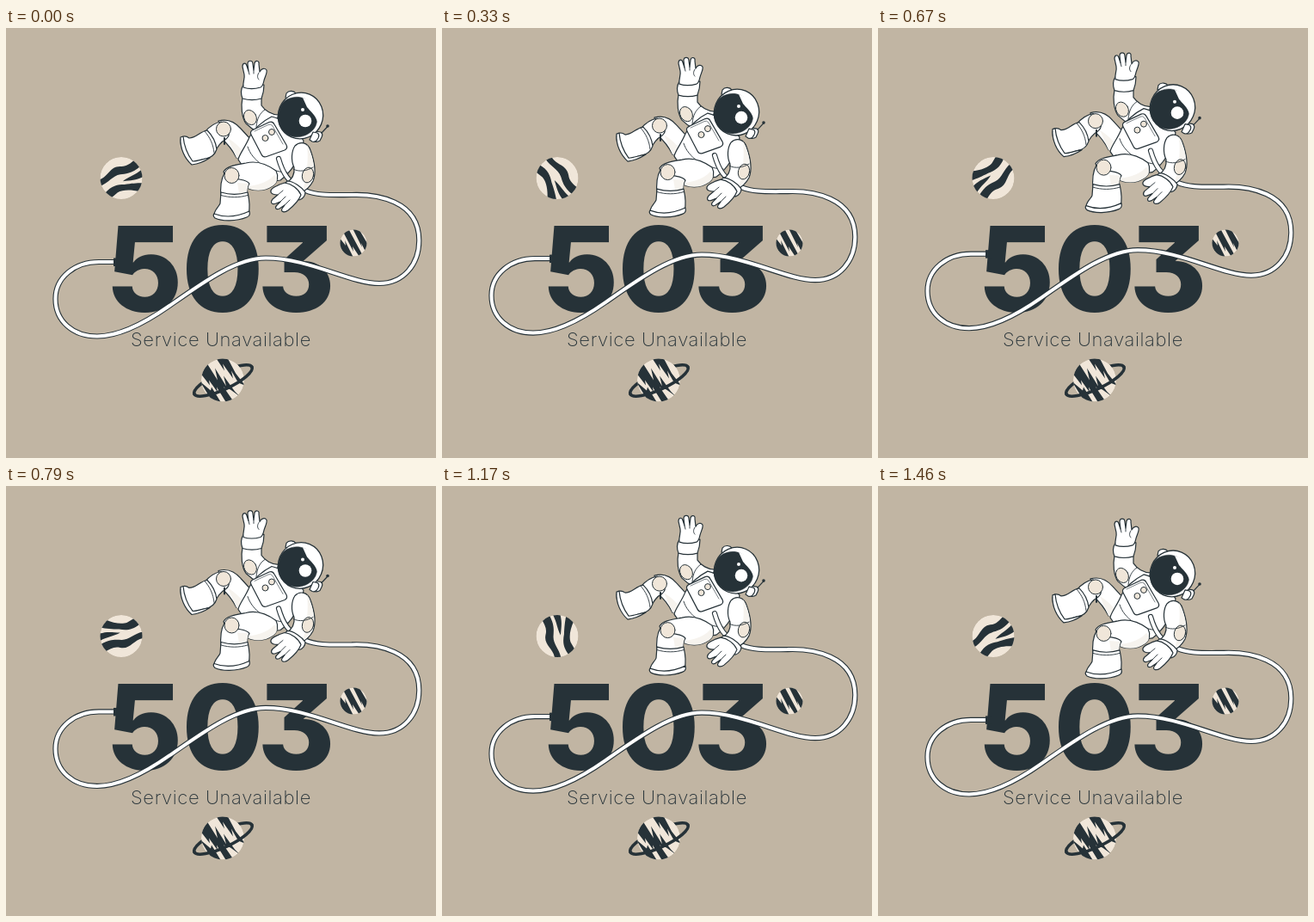
Write an HTML page with a canvas that moves like this. It is 500x500 px and loops after 1500 ms.

```html
<!DOCTYPE html>
<html lang="en">
<head>
<meta charset="utf-8">
<title>503</title>
<style>
  html, body { margin: 0; width: 100%; height: 100%; overflow: hidden; background: #c1b5a3; }
  svg, canvas { position: absolute; left: 0; top: 0; width: 500px; height: 500px; }
  text { fill: #263238; text-anchor: middle; font-family: Inter, "Open Sans", sans-serif; }
  .code { font-size: 137px; font-weight: 780; font-feature-settings: "cv09"; }
  .caption { font-size: 22px; font-weight: 200; letter-spacing: 0.6px; }
</style>
</head>
<body>
<svg viewBox="0 0 500 500">
  <text class="code" x="162 252 337.5" y="329.5">503</text>
  <text class="caption" x="250" y="370">Service Unavailable</text>
</svg>
<canvas id="stage"></canvas>
<script>
const LOOP = 1500, TAU = Math.PI * 2;
const INK = '#263238', CREAM = '#f0e6d9', WHITE = '#fff', SHADE = '#f6f3ee';
const canvas = document.getElementById('stage');
const ctx = canvas.getContext('2d');
const ratio = window.devicePixelRatio || 1;
canvas.width = canvas.height = 500 * ratio;
ctx.lineCap = ctx.lineJoin = 'round';

// A null fill means outline only; a zero line means fill only.
const part = (d, fill = WHITE, line = 1.2) => ({ path: new Path2D(d), fill, line });
const crease = (d, line = 0.9) => part(d, null, line);

function oval(x, y, rx, ry = rx, angle = 0, fill = WHITE, line = 1) {
  const path = new Path2D();
  path.ellipse(x, y, rx, ry, angle, 0, TAU);
  return { path, fill, line };
}

function paint(parts) {
  ctx.strokeStyle = INK;
  for (const { path, fill, line } of parts) {
    if (fill) { ctx.fillStyle = fill; ctx.fill(path); }
    if (line) { ctx.lineWidth = line; ctx.stroke(path); }
  }
}

const raisedArm = [
  part('M275 81 C273 91 274 104 279 111 C287 119 300 126 308 127 L317 101 C309 101 301 96 297 90 L297 81Z'),
  oval(284, 104, 7, 9, -0.5, CREAM),
  crease('M291 115 C292 105 295 99 301 95'),
  part('M276 66 C273 71 273 77 275 82 C282 84 290 84 297 82 C299 77 300 72 300 66Z'),
  part('M276 69 C275 63 278 59 277 54 L275 45 C275 40 279 40 280 44 L282 50 L281 42 C281 37 287 37 287 42 L288 49 L289 41 C290 37 295 38 294 42 L295 51 C297 47 301 46 303 49 C304 52 301 57 300 61 C299 66 298 68 296 69 C289 71 282 71 276 69Z'),
  crease('M282 50 L283 54 M288 49 L288 53 M294 52 C292 55 292 58 294 60')
];

const body = [
  part('M309 103 C299 108 288 117 283 127 C278 139 271 147 270 153 C280 170 300 180 319 177 C329 170 344 151 346 131 C339 120 323 106 309 103Z'),
  crease('M281 138 C286 154 304 167 327 168')
];

const farLeg = [
  part('M247 108 C258 105 267 110 273 117 L284 129 C286 142 280 152 268 151 C264 143 258 135 251 129Z'),
  part('M258 128 C266 133 273 139 278 148 C274 152 271 152 268 151Z', SHADE, 0),
  part('M231 121 C237 114 244 110 250 109 C260 113 262 124 256 129 C249 133 245 139 242 146 L235 148Z'),
  part('M213 128 C221 128 226 120 234 119 C240 125 244 133 245 141 C243 147 238 151 232 152 C225 153 222 157 217 157 C209 152 203 140 203 130 C204 125 209 125 213 128Z'),
  part('M203 127 C202 140 208 152 216 159 C224 158 231 155 237 151 C229 152 223 155 217 155 C211 147 207 137 206 126Z', WHITE, 1.2),
  crease('M231 120 C237 127 241 135 242 145'),
  oval(253, 117.5, 8.5, 8.5, 0, CREAM),
  crease('M254 128 L254 135', 2)
];

const nearLeg = [
  part('M253 167 C257 160 269 159 279 157 C291 154 303 158 314 166 C317 172 316 179 311 183 C300 191 286 190 277 184 L258 182Z'),
  part('M277 184 C288 184 303 181 312 171 C317 175 315 180 311 183 C300 191 286 190 277 184Z', SHADE, 0),
  part('M254 169 C249 177 249 187 250 198 L281 198 C280 191 280 185 283 181 C278 174 268 179 254 169Z'),
  part('M269 180 L282 181 C280 187 280 193 281 198 L272 198Z', SHADE, 0),
  oval(262.5, 171.5, 8.5, 9, 0, CREAM),
  part('M250 191 C260 194 271 194 281 191 C283 200 284 209 282 216 C270 223 253 223 242 219 C241 212 247 209 249 204Z'),
  part('M242 216 C255 221 270 219 283 213 C284 217 283 219 280 220 C268 225 251 225 243 221 C241 219 241 217 242 216Z', WHITE, 1.2),
  crease('M250 194.5 C260 197.5 271 197.5 281 194.5')
];

const chest = [
  part('M288 118 L306 109.5 Q310 108 312 112 L326 136 Q328 140 324 142 L303 149.5 Q299 151 297 147 L285 124 Q283 120 288 118Z'),
  crease('M289 120 L305 112.5 Q308 111 310 114 L322 135', 0.6),
  oval(301.5, 128, 3.5, 3.5, 0, CREAM),
  oval(309, 121, 3.5, 3.5, 0, CREAM)
];

const loweredArm = [
  part('M336 137 C342 131 351 133 354 142 C358 153 361 168 357 178 C354 184 347 190 341 193 L326 180 C333 176 336 171 335 162 C331 154 332 143 336 137Z'),
  part('M350 136 C357 148 361 168 356 178 C353 183 349 186 345 189 C350 172 352 153 350 136Z', SHADE, 0),
  oval(351, 171, 6.5, 9, 0.25, CREAM),
  crease('M334 164 C341 168 350 166 357 162'),
  part('M327 178 C334 178 344 185 348 191 C348 195 345 199 341 200 L321 184Z'),
  part('M324 180 C332 181 340 187 343 194 C340 202 333 208 328 212 C324 215 319 214 321 210 L324 206 L318 210 C314 212 312 209 315 206 L319 202 L314 204 C309 206 307 203 310 199 L316 194 C312 194 307 193 308 189 C309 185 315 184 318 182Z'),
  crease('M319 202 L325 196 M324 206 L330 200 M316 194 L322 189')
];

const head = [
  part('M325 81 L326 76 C329 72 335 73 337 76 L336 83Z'),
  part('M360 120 L366 121 Q369 123 367 127 L365 131 Q362 133 359 132 L355 130Z'),
  oval(342.5, 102, 26, 27, 0.4, WHITE, 1.3),
  part('M357 121 L362 122 Q365 124 363 128 L361 131 Q359 133 356 132 L353 130Z'),
  part('M327 83 C337 78 347 80 354 87 C361 94 364 105 360 114 C355 124 341 130 329 125 C318 119 315 109 317 99 C318 92 321 86 327 83Z', INK, 0.5),
  part('M345 81 C355 84 364 92 365 104 C365 106 364 108 362 109 C360 101 354 97 350 92Z', WHITE, 0),
  oval(348, 108, 7.3, 7.3, 0, WHITE, 0),
  oval(345, 95, 2, 2, 0, WHITE, 0),
  crease('M367 122 L374 114.5', 1.2),
  oval(374, 114, 1.8, 1.8, 0, INK, 0)
];

const tube = new Path2D('M317 152 C321 166 328 182 348 189 C362 195 378 194 402 194 C430 193 480.3 200 480.3 247 C480.3 275 462 297 434 297 C400 297 352 267.5 302 267.5 C268 267.5 230 295 190 323 C160 344 132 358.5 106 358.5 C78 358.5 57.5 341 57.5 315 C57.5 290 80 272 108 272 L127 272');

const waves = new Path2D(
  'M-24 -17 C-12 -9 -2 -20 8 -11 C13 -6 19 -6 26 -6 L26 4 C12 4 7 -1 2 -4 C-6 -9 -14 -5 -25 -9Z' +
  'M-26 1 C-14 -1 -8 3 -2 8 C6 13 10 16 17 22 L6 26 C0 17 -8 11 -14 10 L-26 10Z' +
  'M-1 4 C8 4 14 8 26 8 L23 16 C12 14 8 10 -1 4Z');
const shards = new Path2D(
  'M-25 -7 L-18 -19 L-6 0 L-9 -14 L4 7 L1 -5 L14 13 L20 19 L9 11 L1 8 L12 24 L4 26 L-7 8 L-6 14 L-16 0 L-15 6Z' +
  'M-8 -26 L2 -11 L0 -19 L12 -2 L10 -11 L18 3 L26 6 L15 -8 L6 -25Z' +
  'M-26 2 L-14 12 L-13 8 L-2 26 L-12 25Z');
const streaks = new Path2D(
  'M-17 -7 L-9 3 L-10 -3 L0 17 L-8 16 L-17 3Z' +
  'M-12 -13 L0 10 L-1 4 L7 16 L10 13 L-5 -15Z' +
  'M-1 -17 L10 5 L9 0 L14 10 L17 2 L7 -15Z');

function planet(x, y, radius, pattern, angle = 0) {
  ctx.save();
  ctx.translate(x, y);
  ctx.beginPath();
  ctx.arc(0, 0, radius, 0, TAU);
  ctx.clip();
  ctx.fillStyle = CREAM;
  ctx.fill();
  ctx.rotate(angle);
  ctx.fillStyle = INK;
  ctx.fill(pattern);
  ctx.restore();
}

function ringHalf(from, to) {
  ctx.beginPath();
  ctx.ellipse(252.5, 410, 37, 10, -0.44, from, to);
  ctx.strokeStyle = INK;
  ctx.lineWidth = 3.6;
  ctx.stroke();
}

function drawTube() {
  for (const [color, width] of [[INK, 6.2], [WHITE, 4]]) {
    ctx.strokeStyle = color;
    ctx.lineWidth = width;
    ctx.stroke(tube);
  }
  ctx.fillStyle = INK;
  ctx.fillRect(125, 267.5, 7, 9.5);
}

function draw(now) {
  const turn = (now % LOOP) / LOOP * TAU;
  ctx.setTransform(ratio, 0, 0, ratio, 0, 0);
  ctx.clearRect(0, 0, 500, 500);

  planet(134, 174.5, 24.5, waves, turn - 0.712);
  planet(404, 250, 15.5, streaks);
  ringHalf(Math.PI, TAU);
  planet(252, 409.5, 25, shards);
  ringHalf(0, Math.PI);

  ctx.translate(0, -4.8 * (1 - Math.cos(turn)));
  [raisedArm, farLeg, body, nearLeg, chest].forEach(paint);
  drawTube();
  [loweredArm, head].forEach(paint);
}

const start = performance.now();
function tick() {
  draw(performance.now() - start);
  requestAnimationFrame(tick);
}
tick();
</script>
</body>
</html>
```
